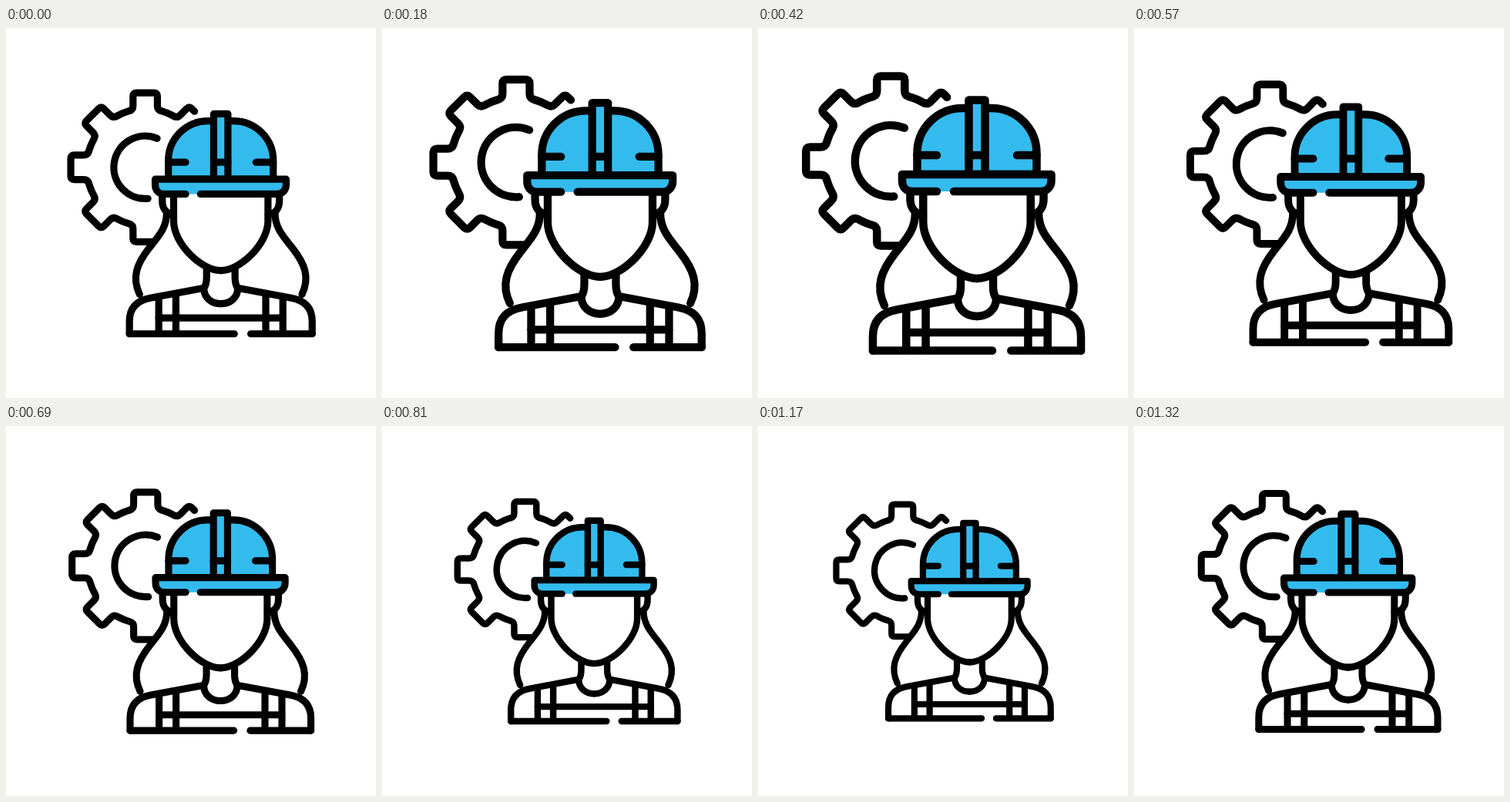
These frames come from a looping animation (480 by 480 pixels, 1350 ms). An HTML page:

```html
<!DOCTYPE html>
<html lang="en">
<head>
<meta charset="utf-8">
<title>Engineer icon</title>
<style>
  html, body { margin: 0; width: 100%; height: 100%; overflow: hidden; background: #fff; }
  svg { display: block; width: 100vw; height: 100vh; }
  #icon { fill: none; stroke: #000; stroke-width: 10.5; stroke-linecap: round; stroke-linejoin: round; }
</style>
</head>
<body>
<svg viewBox="0 0 480 480"><g id="icon"></g></svg>
<script>
const NS = 'http://www.w3.org/2000/svg';
const icon = document.getElementById('icon');
const BLUE = '#34bbee';
const AXIS = 284;                    // mirror line of the figure
const LOOP = 1350, STEP = 30;
const PIVOT = 240.4, DRAWN = 1.139;  // the shapes are drawn at this scale

function add(d, attrs = {}) {
  const path = document.createElementNS(NS, 'path');
  path.setAttribute('d', d);
  for (const key in attrs) path.setAttribute(key, attrs[key]);
  icon.appendChild(path);
}

function addPair(d) {
  add(d);
  add(d, { transform: `matrix(-1 0 0 1 ${2 * AXIS} 0)` });
}

// Open polyline with rounded corners; each point is [x, y, radius].
function rounded(pts) {
  const toward = (p, q, r) => {
    const len = Math.hypot(q[0] - p[0], q[1] - p[1]);
    const k = Math.min(r / len, 0.5);
    return [p[0] + (q[0] - p[0]) * k, p[1] + (q[1] - p[1]) * k];
  };
  let d = `M${pts[0][0]} ${pts[0][1]}`;
  for (let i = 1; i < pts.length - 1; i++) {
    const p = pts[i];
    d += `L${toward(p, pts[i - 1], p[2])}Q${p[0]} ${p[1]} ${toward(p, pts[i + 1], p[2])}`;
  }
  const end = pts[pts.length - 1];
  return d + `L${end[0]} ${end[1]}`;
}

function gear(cx, cy) {
  const half = 18, tip = 110, base = 85, root = 87;
  const pts = [];
  const put = (deg, x, r, round) => {
    const a = deg * Math.PI / 180, c = Math.cos(a), s = Math.sin(a);
    pts.push([cx + x * c + r * s, cy + x * s - r * c, round]);
  };
  for (let deg = 45; deg >= -180; deg -= 45) {
    const first = deg === 45, last = deg === -180;
    if (first) put(deg, -7, tip, 0);
    else {
      put(deg, half, base, 6);
      put(deg, half, tip, 5);
    }
    if (last) put(deg, -11, tip, 0);
    else {
      put(deg, -half, tip, 5);
      put(deg, -half, base, 6);
      put(deg - 22.5, 0, root, 7);
    }
  }
  add(rounded(pts));
  add(`M${cx + 17.6} ${cy - 42.8}A46.3 46.3 0 1 0 ${cx + 4} ${cy + 46.1}`);
}

function person() {
  addPair('M204 240C204 262 192 274 178 292C160 315 152 335 164 360');   // hair
  addPair('M197.5 212V222C197.5 234 204 241 214 242');                   // ear
  addPair('M214.3 212V252C214.3 285 255 325 284 325');                   // face
  addPair('M263 322V335Q263 345 259 351C259 365 270 374 284 374');       // neck
  addPair('M258 351L180 365.5C160 369 149 380 149 400V418.5');           // shoulder
  addPair('M192.3 364V418M217.6 359V418');                               // straps
  add('M192.3 395H375.5');
  add('M149 418.5H304M328.3 418.5H419');
}

function helmet() {
  add('M206.5 190V163A58.5 58.5 0 0 1 265 104H303A58.5 58.5 0 0 1 361.5 163V190Z', { fill: BLUE });
  addPair('M206.5 165H232');
  add('M273.5 190V93.5H294.5V190Z', { fill: BLUE });
  add('M273.5 165H294.5');
  const brim = 'M232 212H200C192 212 187 206 187 198V190H380.5V198C380.5 206 375 212 367 212H254';
  add(brim, { fill: BLUE });
}

function draw(ms) {
  const t = Math.floor((ms + 1) / STEP) * STEP % LOOP;
  const scale = (1 + 0.15 * Math.sin(2 * Math.PI * t / LOOP)) / DRAWN;
  icon.setAttribute('transform',
    `translate(${PIVOT} ${PIVOT}) scale(${scale}) translate(${-PIVOT} ${-PIVOT})`);
}

gear(172.3, 172.5);
person();
helmet();

const start = performance.now();
function tick() {
  draw(performance.now() - start);
  requestAnimationFrame(tick);
}
draw(0);
requestAnimationFrame(tick);
</script>
</body>
</html>
```
